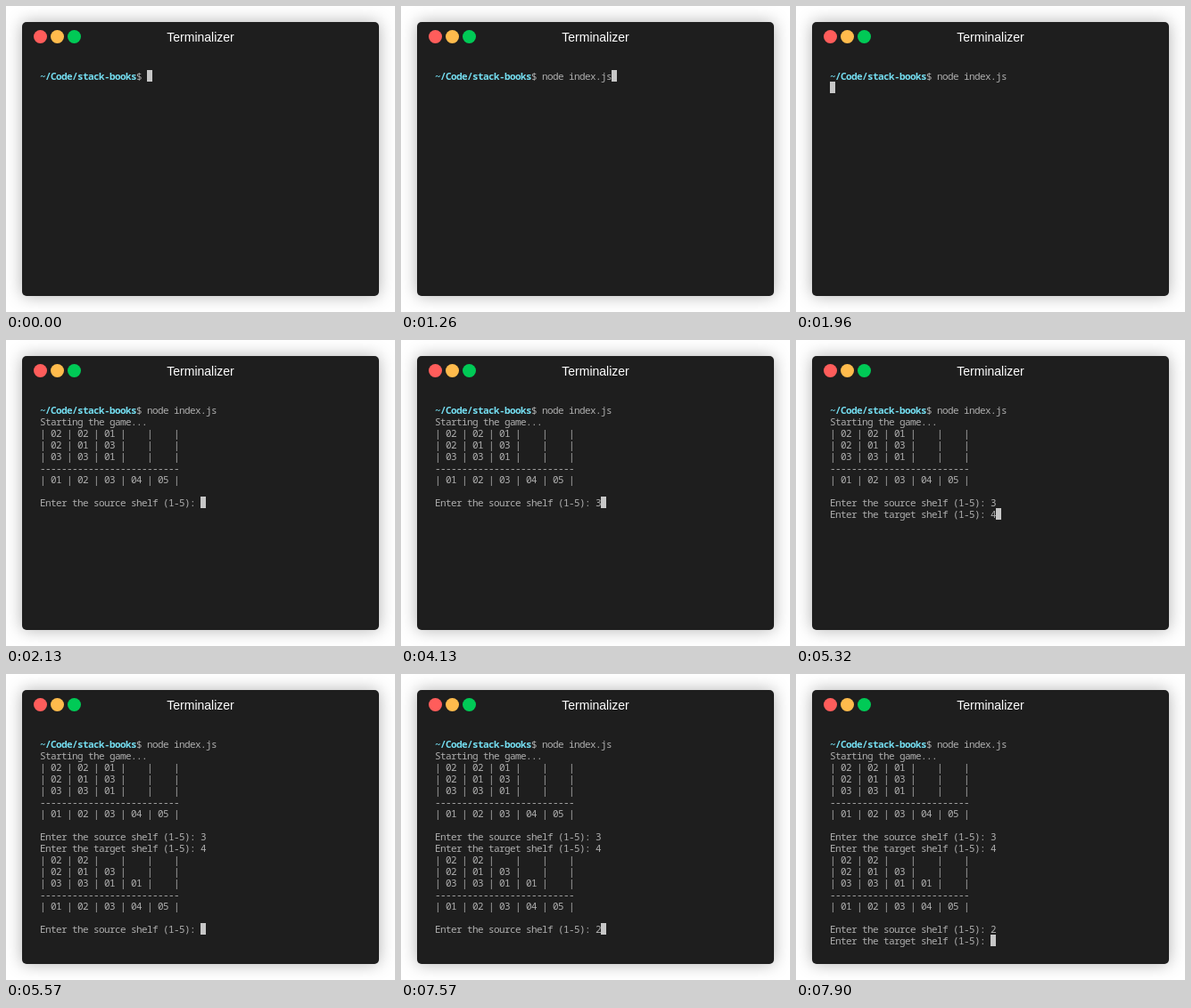
These frames come from a looping animation (436 px wide and 344 px high, 8 s). An HTML page:

```html
<!DOCTYPE html>
<html lang="en">
<head>
<meta charset="utf-8">
<title>Terminal</title>
<style>
  html, body { margin: 0; width: 100%; height: 100%; overflow: hidden; background: #fff; }
  svg { display: block; }
  .window { filter: drop-shadow(0 0 9px rgba(0, 0, 0, .3)); }
  .title { font: 14px "Liberation Sans", Arial, sans-serif; fill: #fff; text-anchor: middle; }
  .line { font: 300 11px "Noto Sans Mono", monospace; letter-spacing: -.6px; fill: #afafaf; white-space: pre; }
  .path { font-weight: 700; fill: #75dff2; }
</style>
</head>
<body>
<svg width="436" height="344" viewBox="0 0 436 344">
  <rect class="window" x="18" y="18" width="400" height="308" rx="5" fill="#1e1e1e"/>
  <circle cx="38.5" cy="34.5" r="7.5" fill="#ff5d5b"/>
  <circle cx="57.5" cy="34.5" r="7.5" fill="#ffbb4c"/>
  <circle cx="76.5" cy="34.5" r="7.5" fill="#00ca56"/>
  <text class="title" x="218" y="40">Terminalizer</text>
  <g id="screen"></g>
  <rect id="cursor" width="6" height="13" fill="#c7c7c7"/>
</svg>
<script>
const LEFT = 38, TOP = 72, CELL = 6, ROW = 13, LOOP = 8000;
const PATH = "~/Code/stack-books";
const screen = document.getElementById("screen");
const cursor = document.getElementById("cursor");

const ask = kind => `Enter the ${kind} shelf (1-5): `;
const row = cells => "| " + cells.map(c => c ? "0" + c : "  ").join(" | ") + " |\n";
const board = rows =>
  rows.map(row).join("") + "-".repeat(26) + "\n" + row([1, 2, 3, 4, 5]) + "\n";

// Terminal output: [time in ms, text appended]
const output = [
  [0, PATH + "$ "],
  [1260, "node index.js"],
  [1960, "\n"],
  [2030, "Starting the game...\n"],
  [2130, board([[2, 2, 1, 0, 0], [2, 1, 3, 0, 0], [3, 3, 1, 0, 0]]) + ask("source")],
  [4130, "3"],
  [4540, "\n" + ask("target")],
  [5320, "4"],
  [5570, "\n" + board([[2, 2, 0, 0, 0], [2, 1, 3, 0, 0], [3, 3, 1, 1, 0]]) + ask("source")],
  [7570, "2"],
  [7900, "\n" + ask("target")]
];

function addText(parent, tag, text, attrs) {
  const el = document.createElementNS("http://www.w3.org/2000/svg", tag);
  for (const key in attrs) el.setAttribute(key, attrs[key]);
  el.textContent = text;
  return parent.appendChild(el);
}

let shown = "";
function render(ms) {
  const text = output.filter(([at]) => at <= ms).map(([, part]) => part).join("");
  if (text === shown) return;
  shown = text;
  const lines = text.split("\n");
  screen.replaceChildren();
  lines.forEach((line, i) => {
    const y = TOP + ROW * i + 11;
    const isPrompt = line.startsWith(PATH);
    if (isPrompt) addText(screen, "text", PATH, { class: "line path", x: LEFT, y });
    const skip = isPrompt ? PATH.length : 0;
    addText(screen, "text", line.slice(skip), { class: "line", x: LEFT + skip * CELL, y });
  });
  cursor.setAttribute("x", LEFT + CELL * lines.at(-1).length);
  cursor.setAttribute("y", TOP + ROW * (lines.length - 1));
}

const start = performance.now();
function tick() {
  render((performance.now() - start) % LOOP);
  requestAnimationFrame(tick);
}
tick();
</script>
</body>
</html>
```
